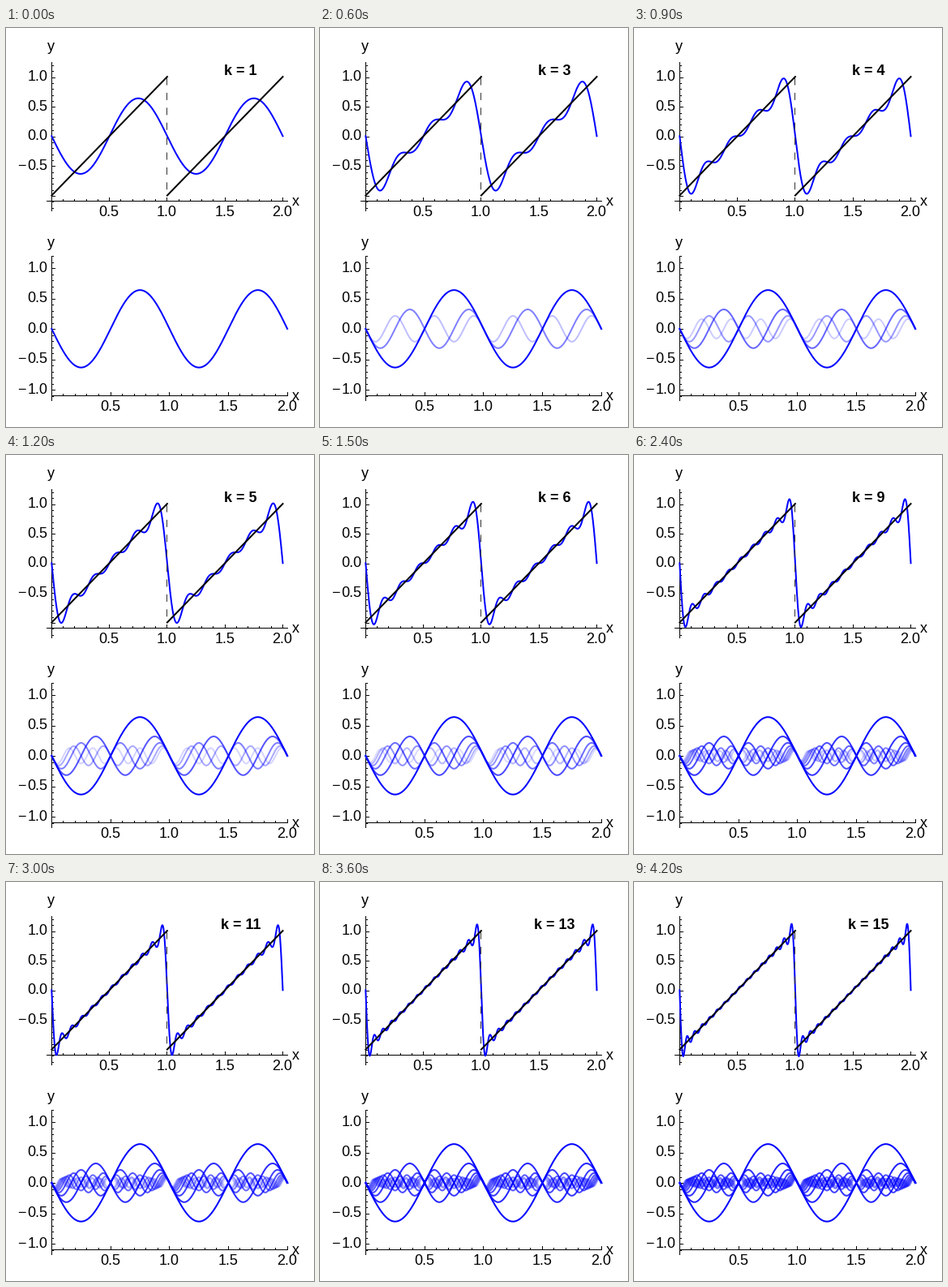
These frames come from a looping animation (380x492 px, 4.5 s). A matplotlib script:

```python
import numpy as np
import matplotlib.pyplot as plt
from matplotlib.animation import FuncAnimation

W, H, DPI = 380, 492, 100
PX = 72 / DPI  # points per pixel
TERMS = 15
BLUE = "#0000ff"

plt.rcParams["font.family"] = "Liberation Sans"

fig = plt.figure(figsize=(W / DPI, H / DPI), dpi=DPI, facecolor="white")
ax = fig.add_axes([0, 0, 1, 1])
ax.set_xlim(0, W)
ax.set_ylim(H, 0)
ax.axis("off")


def line(xs, ys, color="black", width=1, z=2, **kw):
    return ax.plot(xs, ys, color=color, lw=width * PX, zorder=z, **kw)[0]


def rule(x1, y1, x2, y2, **kw):
    """One-pixel straight line, nudged so it snaps to the pixel it lies in."""
    return line([x1 - 0.5, x2 - 0.5], [y1 + 0.5, y2 + 0.5], **kw)


def label(x, y, s, ha="center", **kw):
    return ax.text(x, y, s, fontsize=18 * PX, ha=ha, va="baseline", **kw)


class Panel:
    """Maps data coordinates to pixels and draws a pair of axes."""

    def __init__(self, y0, sx, sy, axis_y):
        self.x0, self.y0, self.sx, self.sy = 56.3, y0, sx, sy
        self.axis_y = axis_y

    def px(self, x):
        return self.x0 + self.sx * np.asarray(x)

    def py(self, y):
        return self.y0 - self.sy * np.asarray(y)

    def draw_axes(self, left, top, bottom, ticks, lowest_label, name_y):
        rule(left, self.axis_y, 347.5, self.axis_y)
        rule(self.x0, top, self.x0, bottom)
        for i in range(21):
            x, size = self.px(i / 10), 4 if i % 5 == 0 else 2
            rule(x, self.axis_y, x, self.axis_y - size)
            if i and i % 5 == 0:
                label(x - 0.6, self.axis_y + 20, f"{i / 10:.1f}")
        for i in ticks:
            y, size = self.py(i / 10), 4 if i % 5 == 0 else 2
            rule(self.x0, y, self.x0 + size, y)
            if i % 5 == 0 and i >= lowest_label:
                label(51.6, y + 5, f"{abs(i) / 10:.1f}", ha="right")
                if i < 0:
                    label(24.5, y + 5, "\u2212", ha="right")
        label(357.5, self.axis_y + 6.5, "x")
        label(55.2, name_y, "y")


def harmonic(n, x):
    return -2 / (np.pi * n) * np.sin(2 * np.pi * n * x)


top = Panel(133.3, 142.6, 73.2, 212.5)
low = Panel(370.9, 145.4, 75, 452.5)
top.draw_axes(50, 41, 224, range(-12, 13), -5, 28.5)
low.draw_axes(56, 280, 458, range(-11, 13), -10, 270)

x = np.linspace(0, 2, 1201)
waves = [harmonic(n, x) for n in range(1, TERMS + 1)]
partial = np.cumsum(waves, axis=0)

total = line(top.px(x), top.py(partial[0]), BLUE, 2, 3)
rule(top.px(1), top.py(1), top.px(1), top.py(-1), color="#333333", z=4,
     dashes=(9, 9.4), dash_capstyle="butt")
for start in (0, 1):
    line(top.px([start, start + 1]), top.py([-1, 1]), width=2, z=5)

parts = [line(low.px(x), low.py(w), BLUE, 2, 3) for w in waves]
title = label(289.5, 58, "", weight="bold")


def update(i):
    k = i + 1
    total.set_ydata(top.py(partial[i]))
    title.set_text(f"k = {k}")
    for n, part in enumerate(parts, 1):
        part.set_visible(n <= k)
        part.set_alpha(1 if n == 1 else max(0, 1 - n / (k + 1)))
    return [total, title, *parts]


anim = FuncAnimation(fig, update, frames=TERMS, interval=300,
                     repeat=True, repeat_delay=0, blit=False)
plt.show()
```
